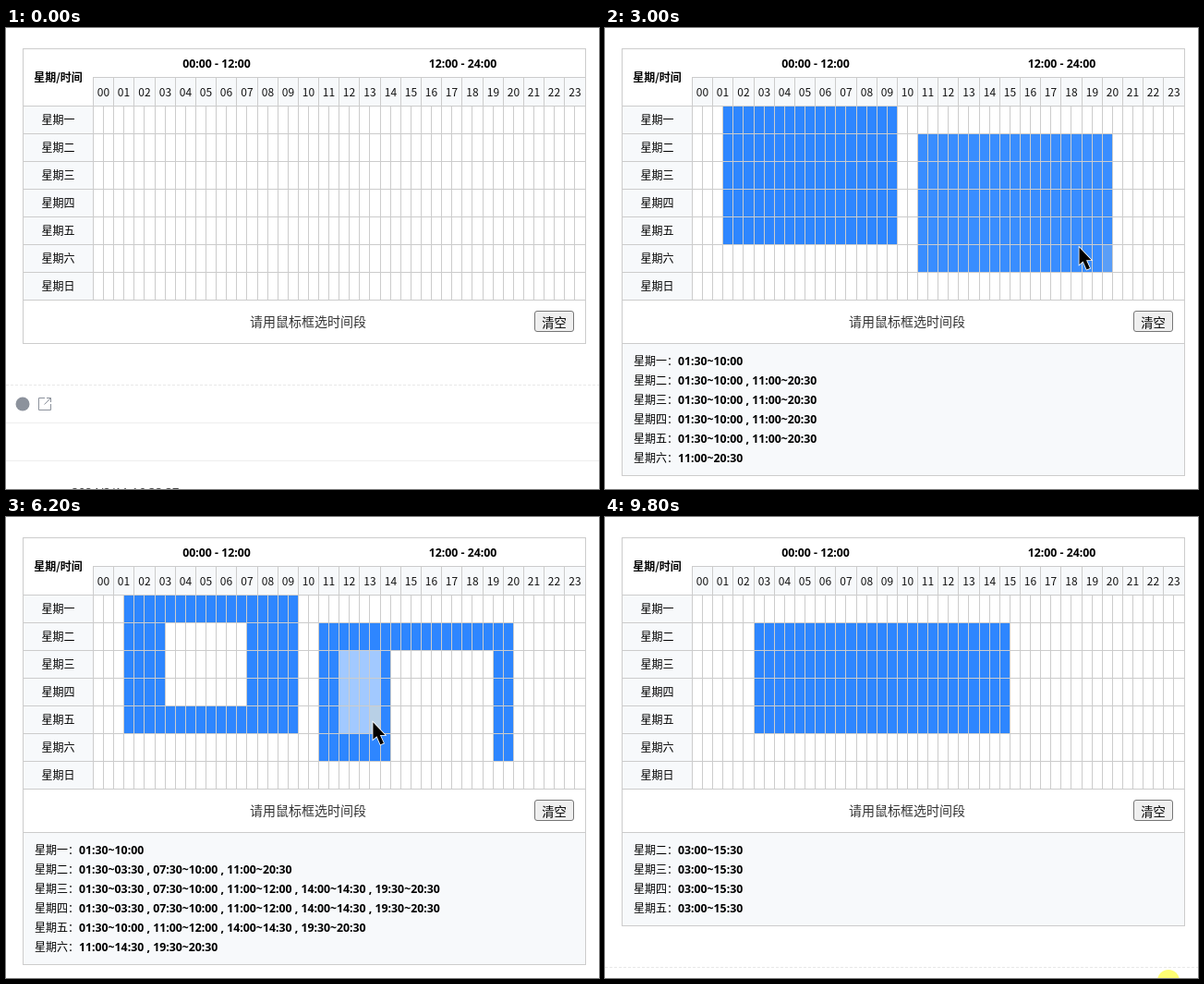
Write an HTML page with a canvas that moves like this. It is 642 by 499 pixels and loops after 9900 ms.

```html
<!DOCTYPE html>
<html lang="zh-CN">
<head>
<meta charset="utf-8">
<style>
  html, body { margin: 0; width: 100%; height: 100%; overflow: hidden; background: #fff; }
  canvas { display: block; }
</style>
</head>
<body>
<canvas id="stage" width="642" height="499"></canvas>
<script>
const ctx = document.getElementById('stage').getContext('2d');
const LOOP = 9900, STEP = 100, FADE = 300;
const DAYS = '一二三四五六日';
const LATIN = '"Open Sans", "Noto Sans", "Noto Sans CJK SC", sans-serif';
const CJK = '"Noto Sans CJK SC", "Noto Sans CJK", sans-serif';
const LINE = '#ccc', PALE = '#f7f9fb';
const WHITE = [255, 255, 255], BLUE = [46, 134, 255], HOVER = [184, 208, 230];

const mix = (a, b, k) => a.map((v, i) => v + (b[i] - v) * k);
const easeOut = x => 1 - (1 - x) ** 2;
const smooth = x => x * x * (3 - 2 * x);
const rowY = r => 84 + 30 * r;
const two = n => String(n).padStart(2, '0');
const clockText = slot => two(slot >> 1) + (slot % 2 ? ':30' : ':00');
const slotOf = clock => parseInt(clock) * 2 + clock.endsWith('30');

// Half-hour columns are 11px; about every fifth hour is one pixel wider
function colX(c) {
  const hour = c >> 1;
  return 94 + 11 * c + Math.floor((hour + 2 - (hour >= 12)) / 5);
}

// A drag over whole cells, pressed at `start` and released at `end`
function drag(start, end, fromClock, toClock, days) {
  const c0 = slotOf(fromClock), c1 = slotOf(toClock) - 1;
  const r0 = DAYS.indexOf(days[0]), r1 = DAYS.indexOf(days.at(-1));
  return {
    start, end, c0, c1, r0, r1, box: true,
    p0: [colX(c0 + 0.9) + 10, rowY(r0) + 9],
    p1: [colX(c1) + 5, rowY(r1) + 25]
  };
}
const click = (start, p) => ({ start, end: start + 100, p0: p, p1: p });
const wholeGrid = { c0: 0, c1: 47, r0: 0, r1: 6, on: false };

const gestures = [
  drag(700, 1425, '01:30', '10:00', '一五'),
  drag(2100, 2770, '11:00', '20:30', '二六'),
  drag(4050, 4550, '03:30', '07:30', '二四'),
  drag(4800, 5200, '14:30', '19:30', '三六'),
  drag(5700, 6100, '12:00', '14:00', '三五'),
  drag(6500, 6600, '12:30', '13:00', '四'),
  { ...click(7800, [593, 318]), ...wholeGrid },
  drag(8250, 8650, '03:00', '15:30', '二五'),
  click(9800, [610, 502])
];
const edits = gestures.filter(g => 'c0' in g);

function lastEdit(c, r, t) {
  return edits.findLast(e => e.end <= t && c >= e.c0 && c <= e.c1 && r >= e.r0 && r <= e.r1);
}
const isOn = (c, r, t) => !!lastEdit(c, r, t)?.on;

// A drag inverts the state of the cell where it begins
for (const e of edits) e.on ??= !isOn(e.c0, e.r0, e.start);

// Pointer stops: every press and release, plus where the hand rests between them
const stops = [
  [0, 560, 510], [100, 535, 435], [1500, 319, 213], [3000, 513, 237],
  [5300, 510, 231], [7200, 516, 287], [9000, 497, 258], [9600, 610, 502], [LOOP, 610, 502],
  ...gestures.flatMap(g => [[g.start, ...g.p0], [g.end, ...g.p1]])
].sort((a, b) => a[0] - b[0]);

function pointerAt(t) {
  const i = Math.max(1, stops.findIndex(s => s[0] >= t));
  const [t0, ...a] = stops[i - 1], [t1, ...b] = stops[i];
  return mix(a, b, smooth((t - t0) / (t1 - t0)));
}

function cellColor(c, r, t) {
  const e = lastEdit(c, r, t);
  if (!e) return WHITE;
  const target = e.on ? BLUE : WHITE;
  const hovered = e.box && c === e.c1 && r === e.r1;
  const age = t - e.end - (hovered ? 100 : 0);
  if (age >= FADE) return target;
  const before = hovered ? HOVER : isOn(c, r, e.end - 1) ? BLUE : WHITE;
  return mix(before, target, easeOut(Math.max(0, age) / FADE));
}

function rangesOf(r, t) {
  const ranges = [];
  for (let c = 0, from = -1; c <= 48; c++) {
    const on = c < 48 && isOn(c, r, t);
    if (on && from < 0) from = c;
    if (!on && from >= 0) {
      ranges.push(clockText(from) + '~' + clockText(c));
      from = -1;
    }
  }
  return ranges.join(' , ');
}

function box(x, y, w, h, color) {
  ctx.fillStyle = color;
  ctx.fillRect(x, y, w, h);
}
const hLine = (x0, x1, y, color = LINE) => box(x0, y, x1 - x0 + 1, 1, color);
const vLine = (x, y0, y1) => box(x, y0, 1, y1 - y0 + 1, LINE);

function frame(x0, y0, x1, y1) {
  ctx.strokeStyle = LINE;
  ctx.strokeRect(x0 + 0.5, y0 + 0.5, x1 - x0, y1 - y0);
}

function text(s, x, y, font, color = '#000', align = 'left') {
  ctx.font = font;
  ctx.fillStyle = color;
  ctx.textAlign = align;
  ctx.fillText(s, x, y);
}

function disc(x, y, r, color) {
  ctx.fillStyle = color;
  ctx.beginPath();
  ctx.arc(x, y, r, 0, 7);
  ctx.fill();
}

function drawTable(t) {
  const bold = '700 12.3px ' + LATIN;
  box(95, 54, 532, 30, PALE);
  box(19, 85, 75, 209, PALE);
  for (let r = 0; r < 7; r++)
    for (let c = 0; c < 48; c++) {
      const rgb = cellColor(c, r, t).map(Math.round);
      box(colX(c) + 1, rowY(r) + 1, colX(c + 1) - colX(c) - 1, 29, `rgb(${rgb})`);
    }
  for (let c = 0; c <= 48; c++) vLine(colX(c), c % 2 ? 84 : 53, 294);
  for (let r = 0; r <= 7; r++) hLine(18, 627, rowY(r));
  hLine(94, 627, 53);
  frame(18, 22, 627, 341);

  text('星期/时间', 56.5, 58, '700 12px ' + CJK, '#000', 'center');
  text('00:00 - 12:00', 228, 43, bold, '#000', 'center');
  text('12:00 - 24:00', 494.5, 43, bold, '#000', 'center');
  for (let h = 0; h < 24; h++)
    text(two(h), (colX(2 * h) + colX(2 * h + 2)) / 2 + 0.5, 74, '12px ' + CJK, '#111', 'center');
  [...DAYS].forEach((d, r) => text('星期' + d, 56.5, rowY(r) + 20, '12px ' + CJK, '#000', 'center'));
  text('请用鼠标框选时间段', 264, 323, '14px ' + CJK, '#333');

  ctx.beginPath();
  ctx.roundRect(572.5, 306.5, 42, 22, 2.5);
  ctx.fillStyle = '#efefef';
  ctx.fill();
  ctx.strokeStyle = '#767676';
  ctx.stroke();
  text('清空', 593.5, 324, '13.33px ' + CJK, '#000', 'center');
}

// Draws the summary and returns the height it adds to the page
function drawSummary(t) {
  const rows = [...DAYS].map((d, r) => [d, rangesOf(r, t)]).filter(row => row[1]);
  if (!rows.length) return 0;
  const height = rows.length * 21 + 17;
  box(19, 342, 608, height - 1, PALE);
  frame(18, 341, 627, 341 + height);
  rows.forEach(([d, ranges], i) => {
    const y = 365 + 21 * i;
    text(`星期${d}：`, 31, y, '12px ' + CJK);
    text(ranges, 79, y, '700 12.3px ' + LATIN);
  });
  return height;
}

function drawPageBelow(shift) {
  const grey = '#8c929c';
  ctx.save();
  ctx.translate(0, shift);
  for (let x = 0; x < 642; x += 5) box(x, 386, 3, 1, '#e8e8e8');
  hLine(0, 642, 427, '#eee');
  hLine(0, 642, 468, '#eee');
  disc(18, 407, 7.5, grey);
  ctx.strokeStyle = grey;
  ctx.stroke(new Path2D('M42 400.5H35.5V413.5H48.5V407M44 400.5H48.5V405M48.5 400.5L41.5 407.5'));
  text('2024/2/11 16:33:37', 71, 507, '13px ' + LATIN, '#444');
  ctx.restore();
}

function drawSelection(g, t) {
  const [x0, y0] = g.p0;
  const [x1, y1] = pointerAt(Math.max(g.start, t - 20)).map(Math.round);
  box(x0, y0, x1 - x0, y1 - y0, 'rgba(30,160,240,.15)');
  ctx.strokeStyle = '#93b3c4';
  ctx.setLineDash([3, 2]);
  ctx.strokeRect(x0 + 0.5, y0 + 0.5, x1 - x0, y1 - y0);
  ctx.setLineDash([]);
}

function drawPointer(t) {
  const [x, y] = pointerAt(t);
  const held = gestures.find(g => t >= g.start && t < g.end);
  if (held?.box) drawSelection(held, t);
  if (held) disc(x, y, 12, 'rgba(255,255,0,.55)');
  ctx.save();
  ctx.translate(x, y);
  const arrow = new Path2D('M.5 .5V19L4.5 15.5L8.5 24.5L12 23L8 14.2H13.5Z');
  ctx.strokeStyle = '#fff';
  ctx.lineWidth = 1.6;
  ctx.stroke(arrow);
  ctx.fillStyle = '#000';
  ctx.fill(arrow);
  ctx.restore();
}

function draw(now) {
  const t = Math.floor(now % LOOP / STEP) * STEP;
  box(0, 0, 642, 499, '#fff');
  ctx.lineWidth = 1;
  drawTable(t);
  drawPageBelow(drawSummary(t));
  drawPointer(t);
}

const begin = performance.now();
(function tick() {
  draw(performance.now() - begin);
  requestAnimationFrame(tick);
})();
</script>
</body>
</html>
```
